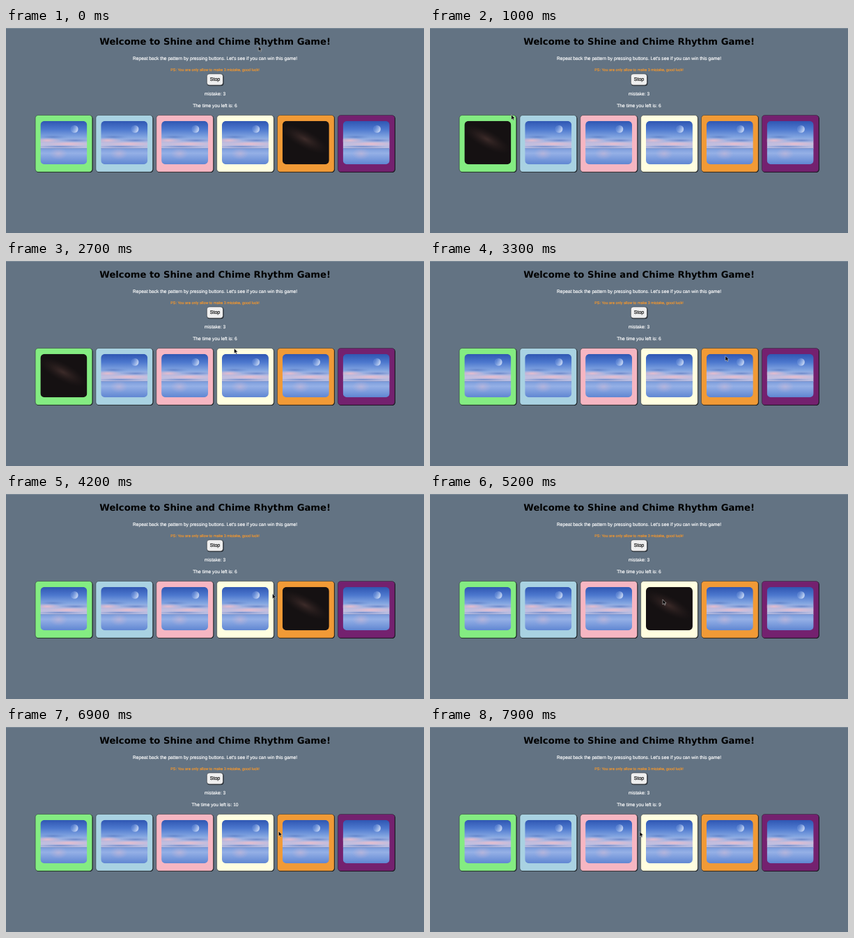
Recreate the animation shown at these times as an HTML page. Size 600x295 px, loop 8 s.

```html
<!DOCTYPE html>
<html lang="en">
<head>
<meta charset="utf-8">
<title>Memory game</title>
<style>
  html, body { margin: 0; width: 100%; height: 100%; overflow: hidden; background: #637383; }
  svg { display: block; width: 600px; height: 295px; }
  text { font-family: "Liberation Sans", Arial, sans-serif; font-size: 6.68px; fill: #fff; stroke: #fff; stroke-width: .16px; text-anchor: middle; text-rendering: geometricPrecision; }
  .title { font: bold 13.2px "DejaVu Sans", Verdana, sans-serif; fill: #000; stroke: none; }
  .note { font-size: 5.45px; fill: #f7982c; stroke: #f7982c; }
  .stop { font-size: 7.1px; fill: #000; stroke: #000; }
</style>
</head>
<body>
<svg viewBox="0 0 600 295">
  <defs>
    <linearGradient id="sky" x1="0" y1="0" x2="0" y2="1">
      <stop offset="0" stop-color="#2f56b2"/>
      <stop offset=".3" stop-color="#4d78ce"/>
      <stop offset=".6" stop-color="#86a8e2"/>
      <stop offset=".82" stop-color="#c3bfdf"/>
      <stop offset="1" stop-color="#b3b9de"/>
    </linearGradient>
    <linearGradient id="sea" x1="0" y1="0" x2="0" y2="1">
      <stop offset="0" stop-color="#7b9cdb"/>
      <stop offset=".3" stop-color="#95b0e6"/>
      <stop offset="1" stop-color="#5f86d2"/>
    </linearGradient>
    <radialGradient id="haze">
      <stop offset="0" stop-color="#4a3431" stop-opacity=".75"/>
      <stop offset="1" stop-color="#2a1e1e" stop-opacity="0"/>
    </radialGradient>
    <radialGradient id="cloud">
      <stop offset="0" stop-color="#efbfcb" stop-opacity=".9"/>
      <stop offset="1" stop-color="#dcb9d0" stop-opacity="0"/>
    </radialGradient>
    <radialGradient id="shade">
      <stop offset="0" stop-color="#5b7cc4" stop-opacity=".8"/>
      <stop offset="1" stop-color="#6f8fd2" stop-opacity="0"/>
    </radialGradient>
    <linearGradient id="moon" x1="0" y1="0" x2="1" y2=".4">
      <stop offset=".3" stop-color="#a9c4f2" stop-opacity=".2"/>
      <stop offset=".95" stop-color="#dbe6fa" stop-opacity=".75"/>
    </linearGradient>
    <clipPath id="frame"><rect width="67" height="62.5" rx="6"/></clipPath>
    <g id="day" clip-path="url(#frame)">
      <rect width="67" height="40" fill="url(#sky)"/>
      <rect y="39.5" width="67" height="23" fill="url(#sea)"/>
      <ellipse cx="18" cy="23" rx="22" ry="3" fill="url(#shade)"/>
      <ellipse cx="10" cy="28" rx="20" ry="4" fill="url(#cloud)"/>
      <ellipse cx="50" cy="28" rx="24" ry="2.6" fill="url(#shade)"/>
      <ellipse cx="40" cy="33" rx="30" ry="3.5" fill="url(#cloud)"/>
      <ellipse cx="28" cy="37" rx="36" ry="2" fill="url(#shade)"/>
      <ellipse cx="26" cy="47" rx="13" ry="9" fill="url(#cloud)" opacity=".4"/>
      <rect y="39.3" width="67" height=".7" fill="#6d8cca"/>
      <circle cx="48.8" cy="11.6" r="5.4" fill="url(#moon)"/>
    </g>
    <g id="night" clip-path="url(#frame)">
      <rect width="67" height="62.5" fill="#151112"/>
      <ellipse cx="32" cy="26" rx="38" ry="13" fill="url(#haze)" transform="rotate(28 32 26)"/>
    </g>
  </defs>

  <rect width="600" height="295" fill="#637383"/>
  <rect width="600" height="1" fill="#7d8b98"/>
  <text class="title" x="300.2" y="24.2">Welcome to Shine and Chime Rhythm Game!</text>
  <text x="300" y="45.6">Repeat back the pattern by pressing buttons. Let's see if you can win this game!</text>
  <text class="note" x="300" y="62">PS: You are only allow to make 3 mistake, good luck!</text>
  <rect x="288.5" y="66.2" width="24" height="17" rx="4" fill="#1b2026"/>
  <rect x="288.3" y="66" width="23.2" height="16.2" rx="3.6" fill="#efefef" stroke="#22272c" stroke-width=".5"/>
  <text class="stop" x="300" y="76.4">Stop</text>
  <text x="300" y="97.4">mistake: 3</text>
  <text id="timer" x="300" y="114.3"></text>
  <g id="cards"></g>
  <path id="cursor" d="M0 0V7.2L1.7 5.7L2.8 8.2L4 7.7L2.9 5.2H5.1Z" fill="#000" stroke="#e8e8e8" stroke-width=".5"/>
</svg>
<script>
  const LOOP = 8000;
  const colors = ["#84ec82", "#a9d2e2", "#f6b6c2", "#fffee0", "#f19a36", "#74216f"];
  // [start, end, card]
  const clues = [[0, 333, 4], [667, 1667, 0], [2000, 3000, 0], [3333, 4333, 4], [4667, 5667, 3]];
  // [start, seconds left]
  const countdown = [[0, 6], [6600, 10], [7600, 9]];
  // [time, x, y]
  const path = [
    [0, 362.3, 26], [1000, 116.8, 124.8], [2100, 231, 114.8], [3300, 424, 136.6],
    [5200, 334, 151.8], [6900, 391.3, 150], [7900, 301, 150.6]
  ];

  const $ = id => document.getElementById(id);
  const timer = $("timer"), cursor = $("cursor");

  $("cards").innerHTML = colors.map((color, i) => `
    <g transform="translate(${41.8 + i * 86.85} 125.2)">
      <rect x=".8" y=".8" width="82" height="82" rx="4.5" fill="#101416"/>
      <rect x=".3" y=".3" width="81.7" height="81.7" rx="4.2" fill="${color}" stroke="#1c2224" stroke-width=".45"/>
      <use class="photo" href="#day" x="7.6" y="8.6"/>
    </g>`).join("");
  const photos = document.querySelectorAll(".photo");

  const ease = u => u * u * (3 - 2 * u);

  function place(t) {
    const next = path.findIndex(p => p[0] > t);
    if (next < 0) return path.at(-1).slice(1);
    const [t0, x0, y0] = path[next - 1], [t1, x1, y1] = path[next];
    const u = ease((t - t0) / (t1 - t0));
    return [x0 + (x1 - x0) * u, y0 + (y1 - y0) * u];
  }

  function draw(now) {
    const t = Math.floor(now % LOOP / 100) * 100;
    const clue = clues.find(([start, end]) => t >= start && t < end);
    photos.forEach((photo, i) =>
      photo.setAttribute("href", clue && clue[2] === i ? "#night" : "#day"));
    timer.textContent = "The time you left is: " + countdown.findLast(([start]) => t >= start)[1];
    cursor.setAttribute("transform", `translate(${place(t)})`);
  }

  const began = performance.now();
  function tick() {
    draw(performance.now() - began);
    requestAnimationFrame(tick);
  }
  tick();
</script>
</body>
</html>
```
